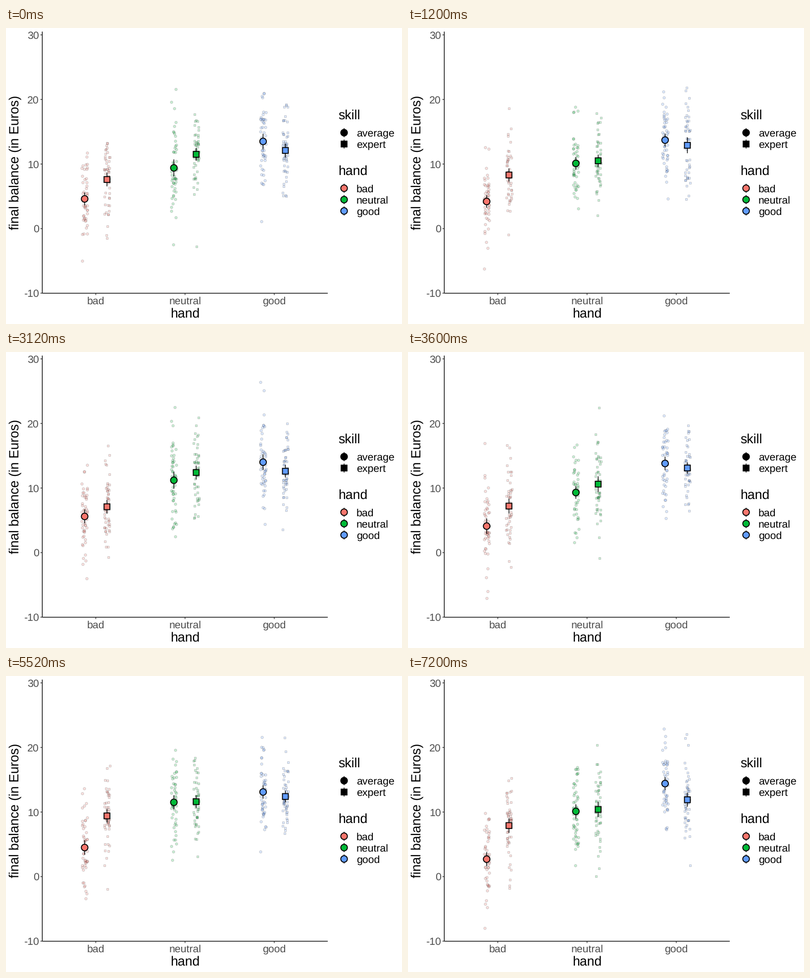
These frames come from a looping animation (800 by 600 pixels, 8000 ms). A matplotlib script:

```python
import numpy as np
import matplotlib.pyplot as plt
from matplotlib.animation import FuncAnimation
from matplotlib.patches import RegularPolygon

DPI = 100
PX = 72 / DPI  # points per pixel
W, H = 800, 600
STEP_MS, N_FRAMES, HOLD = 400, 20, 3
N_PLAYERS, SPREAD = 50, 3.9

LEFT, RIGHT, TOP, BOTTOM = 73.3, 650, 7.3, 537.6
UNIT = (RIGHT - LEFT) / 3.2  # distance between neighbouring hands
TICK = 3.67
TITLE, TEXT, GREY = 26.67, 21.33, "#4D4D4D"

HANDS = {"bad": "#F8766D", "neutral": "#00BA38", "good": "#619CFF"}
SKILLS = {"average": "o", "expert": "s"}

# Mean balance of each group in the successive samples
MEANS = {
    ("bad", "average"): [4.6, 4.2, 5.6, 4.1, 4.5, 4.5, 2.7],
    ("bad", "expert"): [7.6, 8.3, 7.1, 7.2, 9.4, 9.4, 7.9],
    ("neutral", "average"): [9.4, 10.1, 11.2, 9.3, 11.5, 11.1, 10.1],
    ("neutral", "expert"): [11.5, 10.5, 12.4, 10.6, 11.6, 10.1, 10.4],
    ("good", "average"): [13.5, 13.7, 14.0, 13.8, 13.1, 13.7, 14.4],
    ("good", "expert"): [12.1, 12.9, 12.6, 13.1, 12.4, 13.1, 11.9],
}

plt.rcParams["text.hinting"] = "none"
plt.rcParams["font.family"] = "Liberation Sans"

fig = plt.figure(figsize=(W / DPI, H / DPI), dpi=DPI, facecolor="white")
ax = fig.add_axes([0, 0, 1, 1])
ax.set_xlim(0, W)
ax.set_ylim(H, 0)
ax.axis("off")


def to_y(value):
    return 406.6 - 13.09 * np.asarray(value)


def hand_x(i):
    return LEFT + UNIT * (0.6 + i)


def line(xs, ys, color="black", z=1):
    return ax.plot(xs, ys, color=color, lw=1.42 * PX, zorder=z,
                   solid_capstyle="butt", snap=False)[0]


def label(x, y, text, size, color="black", **kw):
    ax.text(x, y, text, fontsize=size * PX, color=color, va="baseline", **kw)


def big_marker(x, y, marker, fill):
    corners, radius = (60, 6.65) if marker == "o" else (4, 8.35)
    shape = RegularPolygon((x, y), corners, radius=radius, orientation=np.pi / 4,
                           fc=fill, ec="black", lw=1.89 * PX, zorder=5, snap=False)
    return ax.add_patch(shape)


def small_markers(marker, fill):
    size = 5.1 if marker == "o" else 4.6
    return ax.scatter([], [], s=(size * PX) ** 2, marker=marker, facecolor=fill,
                      edgecolor="black", alpha=0.2, linewidths=0.95 * PX, zorder=2)


def legend(title, title_y, first_y, keys):
    label(671.5, title_y, title, TITLE)
    for i, (name, marker, fill) in enumerate(keys):
        y = first_y + 23.04 * i
        line([683, 683], [y - 9.2, y + 9.2])
        big_marker(683, y, marker, fill)
        label(708, y + 7.6, name, TEXT)


# Axes
line([LEFT, LEFT], [TOP, BOTTOM])
line([LEFT, RIGHT], [BOTTOM, BOTTOM])
for v in range(-10, 31, 10):
    y = float(to_y(v))
    line([LEFT - TICK, LEFT], [y, y], "#333333")
    label(66.7, y + 7.6, str(v), TEXT, GREY, ha="right")
for i, name in enumerate(HANDS):
    x = hand_x(i)
    line([x, x], [BOTTOM, BOTTOM + TICK], "#333333")
    label(x, 560, name, TEXT, GREY, ha="center")
label((LEFT + RIGHT) / 2, 587, "hand", TITLE, ha="center")
label(26.5, (TOP + BOTTOM) / 2, "final balance (in Euros)", TITLE, ha="center",
      rotation=90, rotation_mode="anchor")

legend("skill", 185, 212.2, [(s, m, "black") for s, m in SKILLS.items()])
legend("hand", 297.3, 324.8, [(h, "o", c) for h, c in HANDS.items()])

# One cloud, interval and mean marker per group
groups = []
for i, (hand, fill) in enumerate(HANDS.items()):
    for side, (skill, marker) in zip((-1, 1), SKILLS.items()):
        x = hand_x(i) + side * UNIT / 8
        groups.append((x, MEANS[hand, skill], small_markers(marker, fill),
                       line([x, x], [0, 0], z=4), big_marker(x, 0, marker, fill)))


def update(frame):
    sample = frame // HOLD
    rng = np.random.default_rng(sample)
    artists = []
    for x, means, cloud, bar, dot in groups:
        mean = means[sample]
        noise = rng.normal(0, SPREAD, N_PLAYERS)
        values = mean + noise - noise.mean()
        half = 1.96 * values.std(ddof=1) / np.sqrt(N_PLAYERS)
        jitter = rng.uniform(-5.6, 5.6, N_PLAYERS)
        cloud.set_offsets(np.column_stack([x + jitter, to_y(values)]))
        bar.set_ydata(to_y([mean - half, mean + half]))
        dot.xy = (x, float(to_y(mean)))
        artists += [cloud, bar, dot]
    return artists


anim = FuncAnimation(fig, update, frames=N_FRAMES, interval=STEP_MS, repeat=True)
plt.show()
```
